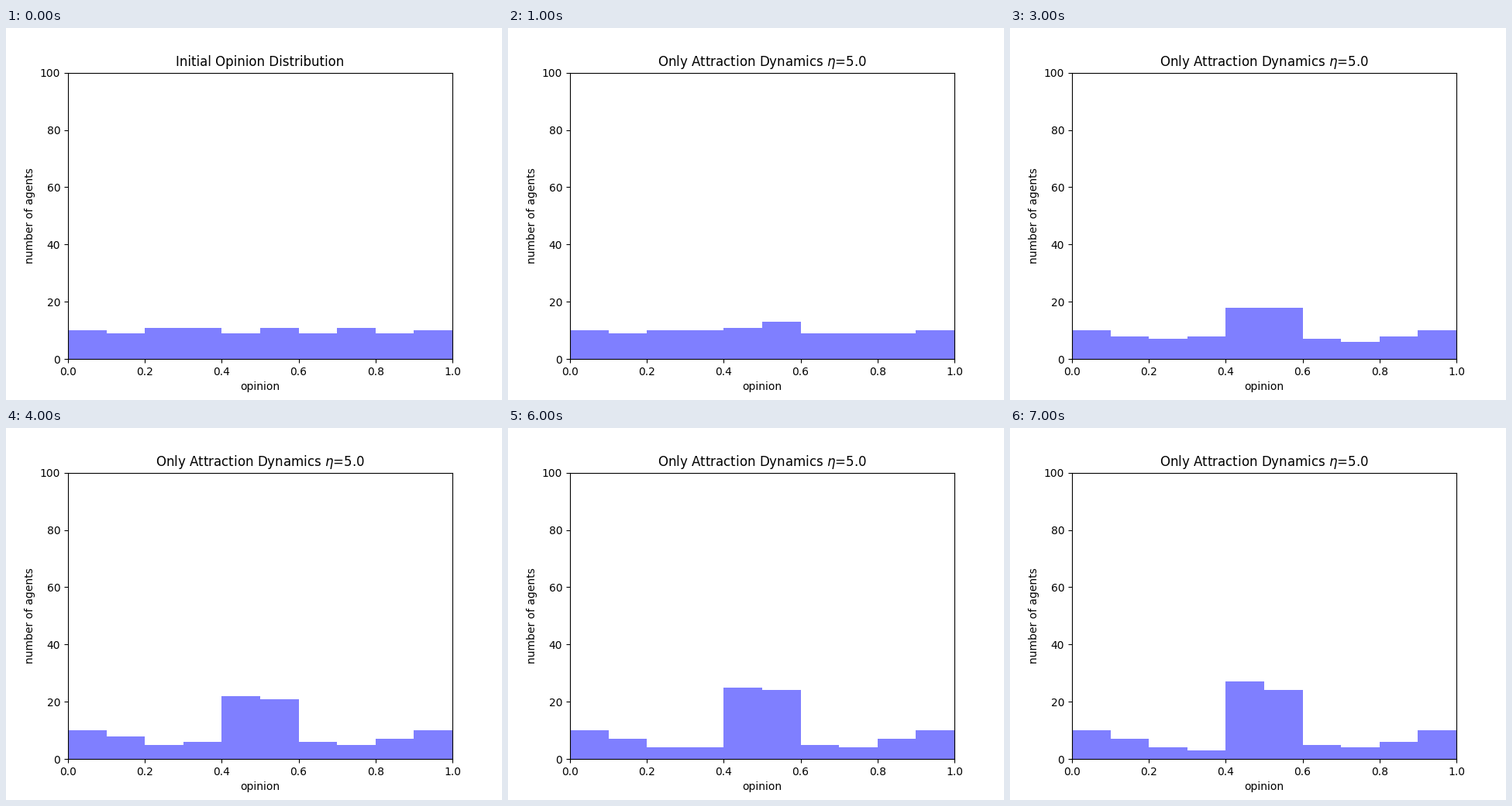
A matplotlib script for the animation above (8000 ms loop, 640 by 480 pixels).

```python
import numpy as np
import matplotlib.pyplot as plt
from matplotlib.animation import FuncAnimation

STEPS, STEP_MS = 8, 1000
AGENTS, BINS, CORE = 100, 10, 4
FAST, SLOW = 4.5, 7

# Start count, drift per step and settling step of each bin beside the core
LEFT = [(10, 0, 0), (9, -0.37, FAST), (11, -1.45, FAST), (11.2, -1.2, SLOW)]
RIGHT = [(10.9, 2.53, 5), (9.49, -0.9, FAST), (11, -1.55, FAST),
         (9, -0.38, SLOW), (10, 0, 0)]
START, DRIFT, SETTLE = np.array(LEFT + RIGHT).T


def counts(step):
    """Bins drift linearly until they settle; the core holds all other agents."""
    outer = np.rint(START + DRIFT * np.minimum(step, SETTLE))
    return np.insert(outer, CORE, AGENTS - outer.sum())


plt.rcParams["font.family"] = "DejaVu Sans"
fig, ax = plt.subplots(figsize=(6.4, 4.8), dpi=100)
bars = ax.bar(np.arange(BINS) / BINS, counts(0), width=1 / BINS, align="edge",
              color="blue", alpha=0.5)
ax.set(xlim=(0, 1), ylim=(0, AGENTS), xlabel="opinion",
       ylabel="number of agents")
title = ax.set_title("Initial Opinion Distribution")


def draw(step):
    for bar, count in zip(bars, counts(step)):
        bar.set_height(count)
    title.set_text("Initial Opinion Distribution" if step == 0
                   else r"Only Attraction Dynamics $\eta$=5.0")
    return [*bars, title]


anim = FuncAnimation(fig, draw, frames=STEPS, interval=STEP_MS,
                     repeat=True, repeat_delay=0, blit=False)
plt.show()
```
